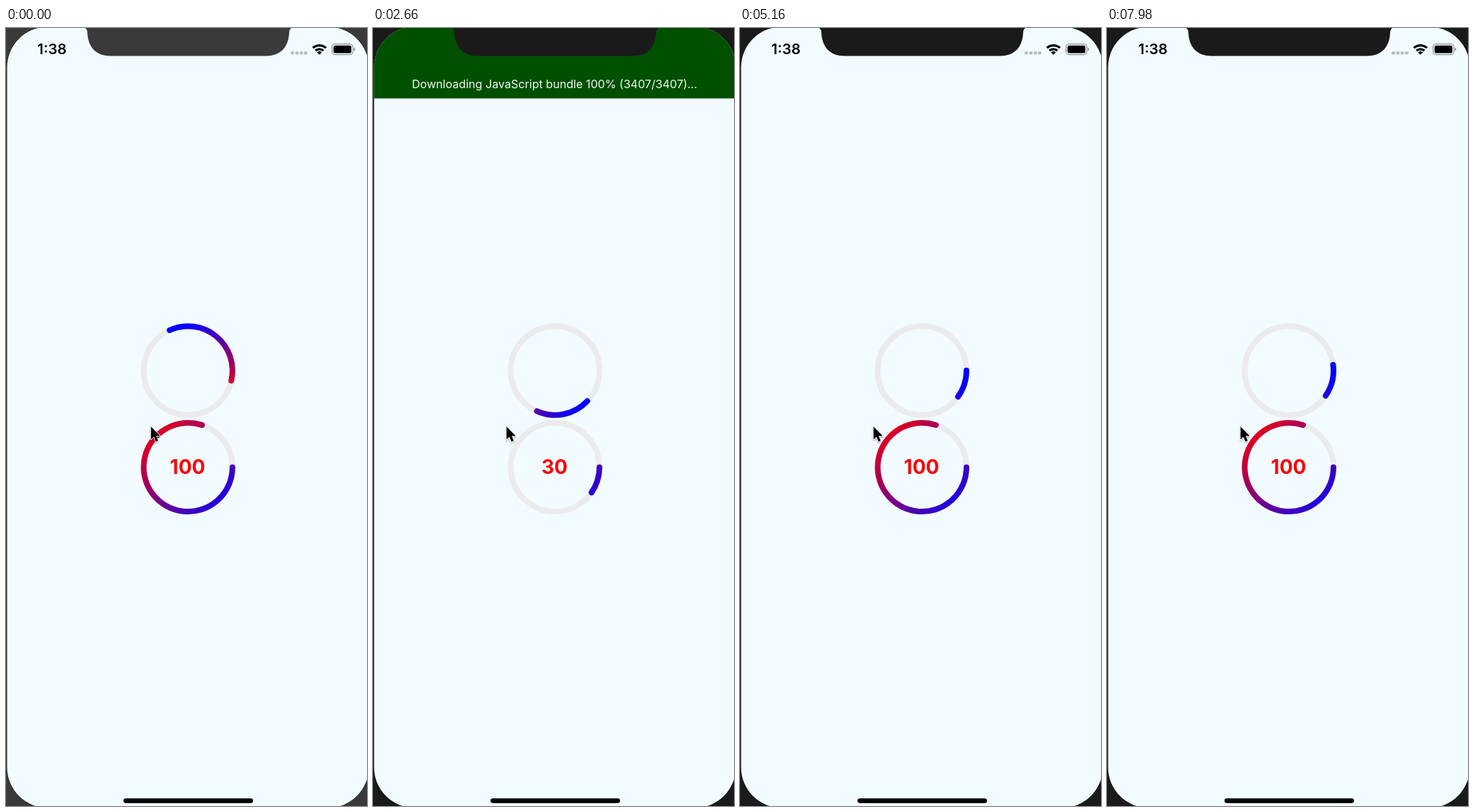
An HTML page for the animation above (8 s loop, 510 px wide and 1099 px high).

```html
<!DOCTYPE html>
<html lang="en">
<head>
<meta charset="utf-8">
<title>Progress rings</title>
<style>
  html, body { margin: 0; width: 100%; height: 100%; overflow: hidden; background: #1a1a1a; }
  svg { display: block; width: 100vw; height: 100vh; }
  text { font-family: Inter, "Open Sans", sans-serif; text-anchor: middle; }
  .arc { fill: none; stroke-width: 8; stroke-linecap: round; }
  .track { fill: none; stroke: #ebebeb; stroke-width: 8; }
</style>
</head>
<body>
<svg viewBox="0 0 510 1099" preserveAspectRatio="none">
  <defs>
    <linearGradient id="spinFill" gradientUnits="userSpaceOnUse" x1="62.7" y1="0" x2="-62.7" y2="0">
      <stop offset="0" stop-color="#00f"/><stop offset="1" stop-color="red"/>
    </linearGradient>
    <linearGradient id="fillFill" gradientUnits="userSpaceOnUse" x1="62.7" y1="62.7" x2="-62.7" y2="-62.7">
      <stop offset="0" stop-color="#00f"/><stop offset="1" stop-color="red"/>
    </linearGradient>
    <clipPath id="glass"><rect x="1.5" y="-1.5" width="511" height="1103" rx="57"/></clipPath>
    <filter id="shade" x="-50%" y="-50%" width="200%" height="200%">
      <feDropShadow dx="0" dy="1.5" stdDeviation="1.3" flood-opacity=".35"/>
    </filter>
  </defs>

  <rect id="bezel" width="510" height="1099"/>
  <rect x="1" y="-2" width="512" height="1104" rx="57.5" fill="#0b0b0b"/>
  <g clip-path="url(#glass)">
    <rect id="page" width="513" height="1099"/>

    <g id="rings">
      <g transform="translate(257.2 484)">
        <circle class="track" r="62.7"/>
        <path id="spin" class="arc" stroke="url(#spinFill)"/>
      </g>
      <g transform="translate(257.2 620.4)">
        <circle class="track" r="62.7"/>
        <path id="fill" class="arc" stroke="url(#fillFill)"/>
        <text id="num" x="-.7" y="10" font-size="28" font-weight="700" fill="#f8060a"></text>
      </g>
    </g>

    <g id="status">
      <text x="65" y="37.4" font-size="20.5" font-weight="600">1:38</text>
      <g fill="#b9bfc2">
        <circle cx="404.6" cy="35.2" r="2.5"/><circle cx="411" cy="35.2" r="2.5"/>
        <circle cx="417.2" cy="35.2" r="2.5"/><circle cx="423.4" cy="35.2" r="2.5"/>
      </g>
      <g fill="none" stroke="#000" stroke-width="3.2">
        <path d="M433.6 28.2A13.4 13.4 0 0 1 452 28.2"/>
        <path d="M437.2 32A8.4 8.4 0 0 1 448.4 32"/>
      </g>
      <path d="M442.8 37.8L439.4 34.4A5 5 0 0 1 446.2 34.4Z"/>
      <rect x="460.6" y="22.6" width="29.4" height="15" rx="4.4" fill="none" stroke="#8c9194" stroke-width="1.2"/>
      <rect x="462.7" y="24.7" width="25.2" height="10.8" rx="2.6"/>
      <path d="M491.4 27.6q2 .8 2 2.5t-2 2.5z" fill="#8c9194"/>
    </g>

    <g id="banner">
      <rect y="-1" width="513" height="100.5" fill="#005000"/>
      <text id="load" x="256.5" y="85" font-size="16.1" fill="#f2f7f2"></text>
    </g>
  </g>

  <path id="notch" d="M109 -1Q115 0 115 7C116 28 128 39.5 148 39.5H367C387 39.5 399 28 400 7Q400 0 406 -1Z"/>
  <rect x="166" y="1088.3" width="183" height="6.6" rx="3.3"/>
  <path id="cursor" d="M0 0V18.2L4.1 14.4L7 21.2L10.2 19.9L7.3 13.2H13Z" stroke="#fff" stroke-width="1.5"
        paint-order="stroke" stroke-linejoin="round" filter="url(#shade)"/>
</svg>
<script>
const LOOP = 8000, R = 62.7, CYCLE = 70, FILES = 3407;
const RELOAD = -29, MOUNT = -11, FIRST = -11.8;
const $ = id => document.getElementById(id);
const set = (id, attrs) => { for (const k in attrs) $(id).setAttribute(k, attrs[k]); };
const show = (id, on) => set(id, { visibility: on ? 'visible' : 'hidden' });
const clamp = x => Math.min(1, Math.max(0, x));
const ease = x => (1 - Math.cos(Math.PI * clamp(x))) / 2;

function tick(t) {
  const d = t - 2500, group = Math.floor(d / 140);
  return 3 * group + Math.min(2, Math.floor((d - group * 140) / 20));
}

function arc(from, sweep) {
  const at = deg => {
    const a = deg * Math.PI / 180;
    return `${(R * Math.cos(a)).toFixed(2)} ${(R * Math.sin(a)).toFixed(2)}`;
  };
  return `M${at(from)}A${R} ${R} 0 ${sweep > 180 ? 1 : 0} 1 ${at(from + sweep)}`;
}

function draw(t) {
  const n = tick(t);
  const before = n < RELOAD, mounted = n >= MOUNT;

  // window and page
  const metal = n < -46 ? '#3a3a3a' : '#1a1a1a';
  set('bezel', { fill: metal });
  set('notch', { fill: metal });
  set('page', { fill: before || mounted ? '#f2fbff' : '#fff' });
  show('rings', before || mounted);

  // spinner: eased turns, arc longest halfway round
  const start = before ? -96.3 : n < 57.5 ? FIRST : 54.5;
  const turn = 360 * ease((n - start) / CYCLE);
  set('spin', {
    d: arc(0, 36 + 0.8 * Math.min(turn, 360 - turn)),
    transform: `rotate(${turn.toFixed(2)})`
  });

  // counter: one pass, then it stays full
  const u = before ? 1 : clamp((n - FIRST) / CYCLE);
  set('fill', { d: arc(0, 288.4 * ease(u)) });
  $('num').textContent = 10 * Math.ceil(u * 10);

  // loading banner
  const p = clamp((n - RELOAD) / 9);
  $('load').textContent =
    `Downloading JavaScript bundle ${Math.floor(p * 100)}% (${Math.floor(p * FILES)}/${FILES})...`;
  show('banner', !before && n < 20);
  set('banner', { transform: `translate(0 ${(-100 * ease((n - 10.9) / 8.4)).toFixed(2)})` });

  const x = 204.8 - 16.2 * ease((n + 51) / 9);
  set('cursor', { transform: `translate(${x.toFixed(2)} 563)` });
}

const begin = performance.now();
function loop() {
  draw((performance.now() - begin) % LOOP);
  requestAnimationFrame(loop);
}
loop();
</script>
</body>
</html>
```
